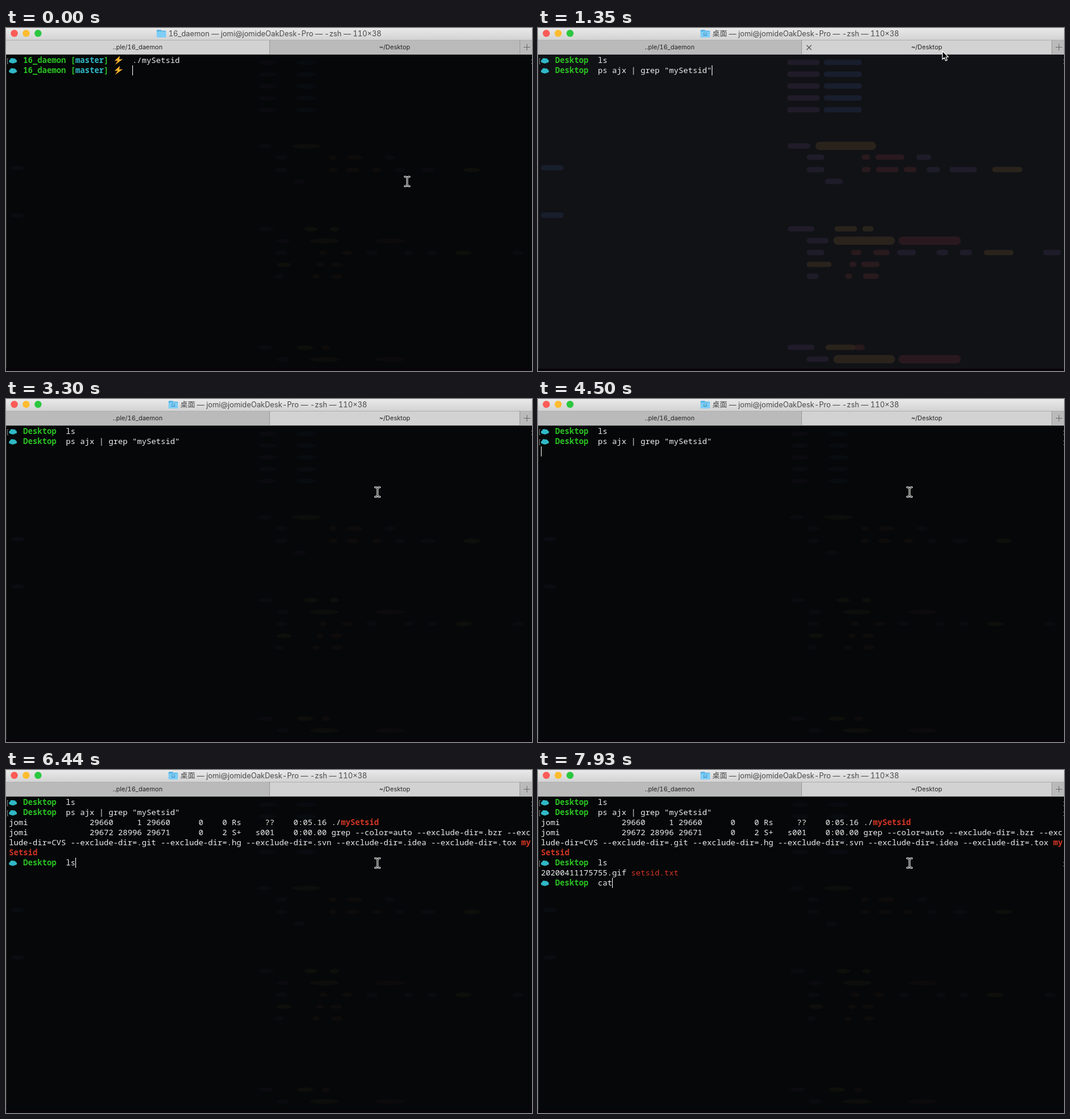
Recreate the animation shown at these times as an HTML page with a canvas. Size 887 by 579 pixels, loop 8000 ms.

```html
<!DOCTYPE html>
<html lang="en">
<head>
<meta charset="utf-8">
<title>Terminal</title>
<style>
  html, body { margin: 0; width: 100%; height: 100%; overflow: hidden; background: #050708; }
  #stage { position: relative; width: 887px; height: 579px; overflow: hidden; }
  #stage > * { position: absolute; white-space: pre; }
  canvas { left: 0; top: 0; }
  #title { top: 0; color: #4a4a4a;
    font: 12.4px/19px Inter, "Noto Sans CJK SC", "Noto Sans CJK", sans-serif;
    font-variant-numeric: tabular-nums; }
  .tab { top: 21px; height: 24px; text-align: center; color: #262626;
    font: 10.6px/24px Inter, sans-serif; font-variant-numeric: tabular-nums; }
  #left { left: 0; width: 444px; }
  #right { left: 445px; width: 421px; }
  #screen { left: 5px; top: 46px; margin: 0; color: #eee;
    font: 500 13.3333px/17px "Noto Sans Mono", "DejaVu Sans Mono", monospace;
    font-variant-ligatures: none; }
  #screen b { font-weight: 700; }
  .g { color: #2bc223; }
  .c { color: #30b8c6; }
  .r { color: #d23524; }
</style>
</head>
<body>
<div id="stage">
  <canvas id="back" width="887" height="579"></canvas>
  <div id="title"></div>
  <div class="tab" id="left">..ple/16_daemon</div>
  <div class="tab" id="right">~/Desktop</div>
  <pre id="screen"></pre>
  <canvas id="front" width="887" height="579"></canvas>
</div>
<script>
const W = 887, H = 579, LOOP = 8000;
const $ = id => document.getElementById(id);
const bg = $('back').getContext('2d');
const fg = $('front').getContext('2d');

const USER = 'jomi';
const HOST = `${USER}@${USER}deOakDesk-Pro — -zsh — 110×38`;

// Ghost of the window behind: y, then colour, x, width per smear
const tint = { p: '#352a44', b: '#25304c', o: '#4a3c24', m: '#4a2529' };
const smears = [
  [199, 'p', 421, 38, 'o', 468, 102],
  [218, 'p', 453, 30, 'm', 546, 14, 'm', 569, 49, 'p', 638, 25],
  [239, 'p', 453, 30, 'm', 546, 15, 'm', 570, 38, 'm', 617, 21, 'p', 655, 23, 'p', 694, 46, 'o', 766, 51],
  [259, 'p', 484, 30],
  [339, 'p', 421, 45, 'o', 500, 38, 'o', 547, 19],
  [359, 'p', 453, 37, 'o', 498, 104, 'm', 608, 105],
  [379, 'p', 453, 30, 'm', 528, 17, 'm', 565, 28, 'p', 605, 32, 'p', 672, 20, 'p', 711, 21, 'o', 752, 50, 'p', 852, 30],
  [399, 'o', 453, 42, 'm', 525, 12, 'm', 545, 31],
  [419, 'p', 453, 20, 'm', 518, 12, 'm', 548, 27],
  [539, 'p', 421, 45, 'o', 485, 50, 'm', 533, 18],
  [559, 'p', 453, 37, 'o', 498, 104, 'm', 608, 105],
  [236, 'b', 5, 38], [316, 'b', 5, 38]
];
for (let i = 0; i < 5; i++) smears.push([58 + 20 * i, 'p', 420, 55, 'b', 482, 64]);

function rect(c, color, x, y, w, h) {
  c.fillStyle = color;
  c.fillRect(x, y, w, h);
}

function poly(c, points) {
  c.beginPath();
  points.forEach(([x, y]) => c.lineTo(x, y));
  c.closePath();
}

function disc(c, color, x, y, rx, ry = rx) {
  c.fillStyle = color;
  c.beginPath();
  c.ellipse(x, y, rx, ry, 0, 0, Math.PI * 2);
  c.fill();
}

function smear(color, x, y, w, lit) {
  if (!lit) {
    bg.globalAlpha = 0.13;
    disc(bg, color, x + w * 0.38, y + 0.5, w * 0.2 + 4, 4);
    return;
  }
  const h = w > 90 ? 14 : 9;
  bg.globalAlpha = 0.42;
  bg.fillStyle = color;
  bg.beginPath();
  bg.roundRect(x, y - h / 2, w, h, h / 2);
  bg.fill();
}

function backdrop(lit) {
  rect(bg, lit ? '#111216' : '#050708', 0, 45, W, H - 45);
  for (const [y, ...parts] of smears)
    for (let i = 0; i < parts.length; i += 3)
      smear(tint[parts[i]], parts[i + 1], y, parts[i + 2], lit);
  bg.globalAlpha = 1;
  rect(bg, '#2a2c2e', 0, 45, 1, H - 45);
  rect(bg, '#080409', 0, 575, W, 4);
}

function folder(x, desk) {
  bg.fillStyle = '#58b4e6';
  bg.beginPath();
  bg.roundRect(x, 3, 8, 6, 1.5);
  bg.roundRect(x, 4.5, 16, 8, 1.5);
  bg.fill();
  bg.fillStyle = '#7fcdf5';
  bg.beginPath();
  bg.roundRect(x, 6, 16, 10, 1.5);
  bg.fill();
  if (desk) {
    rect(bg, '#4a9fd0', x + 5, 8, 6, 5);
    rect(bg, '#8fd6f8', x + 6, 9, 4, 2);
  }
}

function line(c, color, width, segments) {
  c.strokeStyle = color;
  c.lineWidth = width;
  c.beginPath();
  for (const [x1, y1, x2, y2] of segments) {
    c.moveTo(x1, y1);
    c.lineTo(x2, y2);
  }
  c.stroke();
}

function chrome(s) {
  const bar = bg.createLinearGradient(0, 0, 0, 20);
  bar.addColorStop(0, '#e9e9e9');
  bar.addColorStop(1, '#d3d3d3');
  rect(bg, bar, 0, 0, W, 20);
  ['#fc5b57', '#fdbc2f', '#2bc73f'].forEach((c, i) => disc(bg, c, 14 + 20 * i, 9, 6));
  folder(s.desk ? 274 : 254, s.desk);

  const idle = '#bababa', active = '#d2d2d2';
  rect(bg, s.desk ? idle : active, 0, 20, 444, 25);
  rect(bg, s.desk ? active : s.hover ? '#a8a8a8' : idle, 445, 20, 421, 25);
  rect(bg, idle, 867, 20, 20, 25);
  rect(bg, '#b0b0b0', 0, 20, W, 1);
  rect(bg, '#9a9a9a', 444, 20, 1, 25);
  rect(bg, '#9a9a9a', 866, 20, 1, 25);
  rect(bg, '#a5a5a5', 0, 44, W, 1);
  line(bg, '#6a6a6a', 1, [[873, 32.5, 884, 32.5], [878.5, 27, 878.5, 38]]);
  if (s.hover) line(bg, '#555', 1.2, [[453, 29, 461, 37], [461, 29, 453, 37]]);
}

function cloud(y) {
  const c = '#30b8c6';
  disc(bg, c, 8, y + 10, 3, 2.8);
  disc(bg, c, 10, y + 7.8, 3, 3);
  disc(bg, c, 13.5, y + 8, 3, 2.8);
  disc(bg, c, 15.5, y + 9.8, 2.9, 2.6);
  disc(bg, c, 11.5, y + 11, 4, 2.8);
}

function bolt(y) {
  bg.fillStyle = '#fbb32c';
  poly(bg, [[192, y + 1], [183, y + 9.5], [188.5, y + 9], [184, y + 16], [197, y + 6.5], [191, y + 7]]);
  bg.fill();
}

function promptMark(y) {
  line(bg, '#777', 1, [[2.5, y + 5, 2.5, y + 15], [2, y + 5.5, 4, y + 5.5], [2, y + 14.5, 4, y + 14.5]]);
  rect(bg, '#666', 886, y + 7, 1, 2);
  rect(bg, '#666', 886, y + 13, 1, 2);
}

// Terminal contents: each row is { html, prompt, len }
const tag = (cls, text) => `<b class="${cls}">${text}</b>`;
const out = html => ({ html });
const desk = cmd => ({ html: `   ${tag('g', 'Desktop')}  ${cmd}`, prompt: 'desk', len: 12 + cmd.length });
const repo = cmd => ({
  html: `   ${tag('g', '16_daemon')} ${tag('g', '[')}${tag('c', 'master')}${tag('g', ']')}     ${cmd}`,
  prompt: 'repo', len: 26 + cmd.length
});
const found = [
  out(`${USER}             29660     1 29660      0    0 Rs     ??    0:05.16 ./${tag('r', 'mySetsid')}`),
  out(`${USER}             29672 28996 29671      0    2 S+   s001    0:00.00 grep --color=auto --exclude-dir=.bzr --exc`),
  out(`lude-dir=CVS --exclude-dir=.git --exclude-dir=.hg --exclude-dir=.svn --exclude-dir=.idea --exclude-dir=.tox ${tag('r', 'my')}`),
  out(tag('r', 'Setsid'))
];
const listing = out('20200411175755.gif <span class="r">setsid.txt</span>');
const blank = { html: '', len: 0 };

// Latest value whose start time has passed
const pick = (t, list) => list.filter(([at]) => at <= t).pop()[1];

function rowsAt(t) {
  if (t < 1350) return [repo('./mySetsid'), repo('')];
  const rows = [desk('ls'), desk('ps ajx | grep "mySetsid"')];
  if (t < 4500) return rows;
  if (t < 4650) return [...rows, blank];
  rows.push(...found, desk(pick(t, [[0, ''], [6290, 'l'], [6440, 'ls']])));
  if (t < 6740) return rows;
  if (t < 6890) return [...rows, blank];
  return [...rows, listing, desk(pick(t, [[0, ''], [7480, 'c'], [7630, 'ca'], [7930, 'cat']]))];
}

const caretOff = [[450, 900], [2400, 2850], [3300, 3900], [4350, 4500], [5390, 5840]];

function pointerAt(t) {
  if (t < 1200) {
    const k = Math.min(7, Math.floor(t / 150)) / 7;
    const e = k * k * (3 - 2 * k);
    return [676 + 6 * e, 259 - 229 * e];
  }
  if (t < 1500) return [682, 39];
  return t < 1650 ? [645, 112] : [626, 157];
}

function arrow(x, y) {
  poly(fg, [[0, 0], [0, 14], [3.2, 11], [5.5, 16.3], [8, 15.2], [5.8, 10], [10, 10]]
    .map(([a, b]) => [x + a, y + b]));
  fg.lineJoin = 'round';
  fg.fillStyle = '#000';
  fg.fill();
  fg.strokeStyle = '#fff';
  fg.lineWidth = 1.2;
  fg.stroke();
}

function beam(x, y) {
  fg.lineCap = 'round';
  fg.lineJoin = 'round';
  for (const [color, width] of [['#f4f4f4', 3], ['#000', 1]]) {
    fg.strokeStyle = color;
    fg.lineWidth = width;
    fg.beginPath();
    for (const d of [-1, 1]) {
      fg.moveTo(x - 3.5, y + 8 * d);
      fg.quadraticCurveTo(x - 0.5, y + 8 * d, x + 0.5, y + 6 * d);
      fg.quadraticCurveTo(x + 1.5, y + 8 * d, x + 4.5, y + 8 * d);
    }
    fg.moveTo(x + 0.5, y - 6);
    fg.lineTo(x + 0.5, y + 6);
    fg.stroke();
  }
}

let shown = '';

function draw(t) {
  const rows = rowsAt(t);
  const s = { desk: t >= 1350, hover: t >= 1200 && t < 1500, lit: t >= 1350 && t < 1500 };
  const html = rows.map(r => r.html).join('\n');
  const key = JSON.stringify(s) + html;

  if (key !== shown) {
    shown = key;
    backdrop(s.lit);
    chrome(s);
    rows.forEach((r, i) => {
      if (!r.prompt) return;
      const y = 46 + 17 * i;
      cloud(y);
      if (r.prompt === 'repo') bolt(y);
      if (i < rows.length - 1) promptMark(y);
    });
    $('screen').innerHTML = html;
    $('title').textContent = `${s.desk ? '桌面' : '16_daemon'} — ${HOST}`;
    $('title').style.left = s.desk ? '294px' : '274px';
  }

  fg.clearRect(0, 0, W, H);
  if (!caretOff.some(([a, b]) => t >= a && t < b)) {
    const last = rows.length - 1;
    rect(fg, '#fff', 5 + 8 * rows[last].len, 46 + 17 * last, 1, 17);
  }
  const [x, y] = pointerAt(t);
  (y < 45 ? arrow : beam)(x, y);
}

const start = performance.now();
function tick() {
  draw((performance.now() - start) % LOOP);
  requestAnimationFrame(tick);
}
tick();
</script>
</body>
</html>
```
